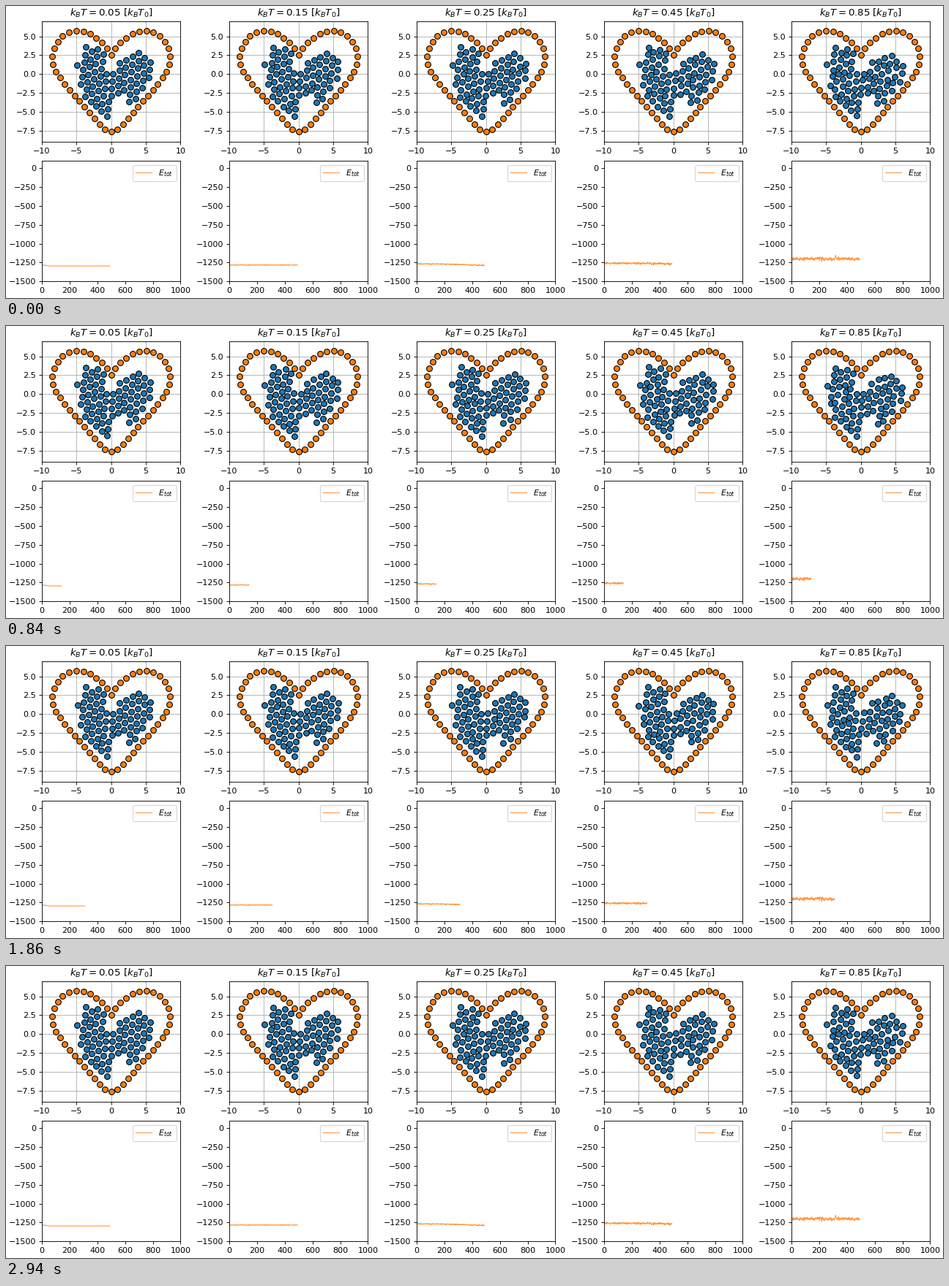
Animation, 1280 px wide and 400 px high, one loop 3 s. Source, as a matplotlib script:

```python
import numpy as np
import matplotlib.pyplot as plt
from matplotlib.animation import FuncAnimation
from matplotlib.path import Path

WIDTH, HEIGHT, DPI = 1280, 400, 80
FRAMES, INTERVAL = 50, 60
STEPS_PER_FRAME = 10
STEPS = FRAMES * STEPS_PER_FRAME

# Temperature, energy before and after relaxing, steps between which it relaxes
PANELS = [(0.05, -1280, -1295, 0, 60),
          (0.15, -1282, -1282, 0, 1),
          (0.25, -1268, -1288, 180, 490),
          (0.45, -1257, -1265, 0, 490),
          (0.85, -1200, -1200, 0, 1)]

# Outlines of the two crystal grains
LEFT_GRAIN = [(-5.2, 1), (-3.9, 3.8), (-1.9, 3.75), (-.8, 3.1), (-.75, .6),
              (-.3, .3), (-.5, -2.6), (-.1, -3.3), (-.4, -5.9), (-1.2, -5.9),
              (-4.4, -2.75), (-4.6, -.5)]
RIGHT_GRAIN = [(-.2, .4), (.5, .6), (1, 1.9), (3.9, 3.2), (5.9, 2.1),
               (5.6, -.8), (4.8, -2.2), (4, -2.6), (3.8, -3.6), (2.5, -4),
               (2.2, -2.6), (1, -2.9), (-.3, -3.4)]
PIVOT = np.array([0.67, -1.8])


def heart_wall(count):
    """Points evenly spaced along a heart curve."""
    t = np.linspace(0, 2 * np.pi, 4001)
    x = 8.5 * np.sin(t) ** 3
    y = np.polyval([9.6, -2.14, -15.3, -1.62, 1.07, 8.835, 2.1], np.cos(t))
    length = np.append(0, np.cumsum(np.hypot(np.diff(x), np.diff(y))))
    at = np.arange(count) * length[-1] / count
    return np.interp(at, length, x), np.interp(at, length, y)


def grain(anchor, lean, spacing, outline):
    """Hexagonal lattice through the anchor, cut to the outline."""
    i, j = (a.reshape(-1, 1) for a in np.mgrid[-15:16, -20:21])
    up, side = (spacing * np.array([np.sin(a), np.cos(a)])
                for a in (lean, lean + np.pi / 3))
    points = np.array(anchor) + i * side + j * up
    return points[Path(outline).contains_points(points)]


def turn(points, angle):
    c, s = np.cos(angle), np.sin(angle)
    return PIVOT + (points - PIVOT) @ np.array([[c, -s], [s, c]])


def push_apart(points, reach=0.96, rounds=40):
    for _ in range(rounds):
        gap = points[:, None] - points
        dist = np.hypot(gap[..., 0], gap[..., 1]) + 1e-9
        overlap = np.clip(reach - dist, 0, None) * (dist > 1e-6)
        points = points + 0.3 * (gap * (overlap / dist)[..., None]).sum(axis=1)
    return points


def smooth_noise(rng, shape, weights):
    noise = rng.normal(size=shape)
    total = sum(w * np.roll(noise, i, axis=0) for i, w in enumerate(weights))
    return total / np.linalg.norm(weights)


def particle_paths(rng, temperature):
    left = grain((-3.64, 3.57), 0.15, 1.0, LEFT_GRAIN)
    right = grain((3.94, 2.79), 0.075, 1.01, RIGHT_GRAIN)
    rest = push_apart(np.vstack([left, turn(right, 0.13 * temperature)]))
    shake = smooth_noise(rng, (FRAMES, *rest.shape), (1, 2, 1))
    return rest + 0.08 * np.sqrt(temperature) * shake


def energy_trace(rng, temperature, before, after, start, end):
    base = np.interp(np.arange(STEPS), [start, end], [before, after])
    return base + 13 * temperature * smooth_noise(rng, STEPS, (1, 1, 1))


def add_axes(left, top, **settings):
    width, height = 189.4, 165.3
    ax = fig.add_axes([left / WIDTH, 1 - (top + height) / HEIGHT,
                       width / WIDTH, height / HEIGHT])
    ax.set(**settings)
    return ax


rng = np.random.default_rng(4)
fig = plt.figure(figsize=(WIDTH / DPI, HEIGHT / DPI), dpi=DPI)
dot_style = dict(ls="none", marker="o", ms=7, mec="black", mew=1)
wall = heart_wall(48)
animated = []

for k, (temperature, *energy) in enumerate(PANELS):
    left = 49 + 256 * k
    box = add_axes(left, 21, xlim=(-10, 10), ylim=(-9, 7),
                   xticks=np.arange(-10, 11, 5),
                   yticks=np.arange(-7.5, 5.1, 2.5))
    box.set_title(rf"$k_BT={temperature:.2f}$ $[k_BT_0]$")
    box.grid()
    dots, = box.plot([], [], color="tab:blue", **dot_style)
    box.plot(*wall, color="tab:orange", **dot_style)

    graph = add_axes(left, 212, xlim=(0, 1000), ylim=(-1500, 100),
                     xticks=np.arange(0, 1001, 200),
                     yticks=np.arange(-1500, 1, 250))
    line, = graph.plot([], [], color="tab:orange", lw=1, alpha=0.8,
                       label="$E_{tot}$")
    graph.legend(loc="upper right")
    animated.append((dots, line, particle_paths(rng, temperature),
                     energy_trace(rng, temperature, *energy)))


def update(frame):
    # The loop opens on its final state
    frame = frame or FRAMES - 1
    count = frame * STEPS_PER_FRAME + 1
    for dots, line, paths, energy in animated:
        dots.set_data(*paths[frame].T)
        line.set_data(np.arange(count), energy[:count])
    return [artist for panel in animated for artist in panel[:2]]


anim = FuncAnimation(fig, update, frames=FRAMES, interval=INTERVAL,
                     init_func=lambda: update(0), repeat=True, repeat_delay=0)
plt.show()
```
